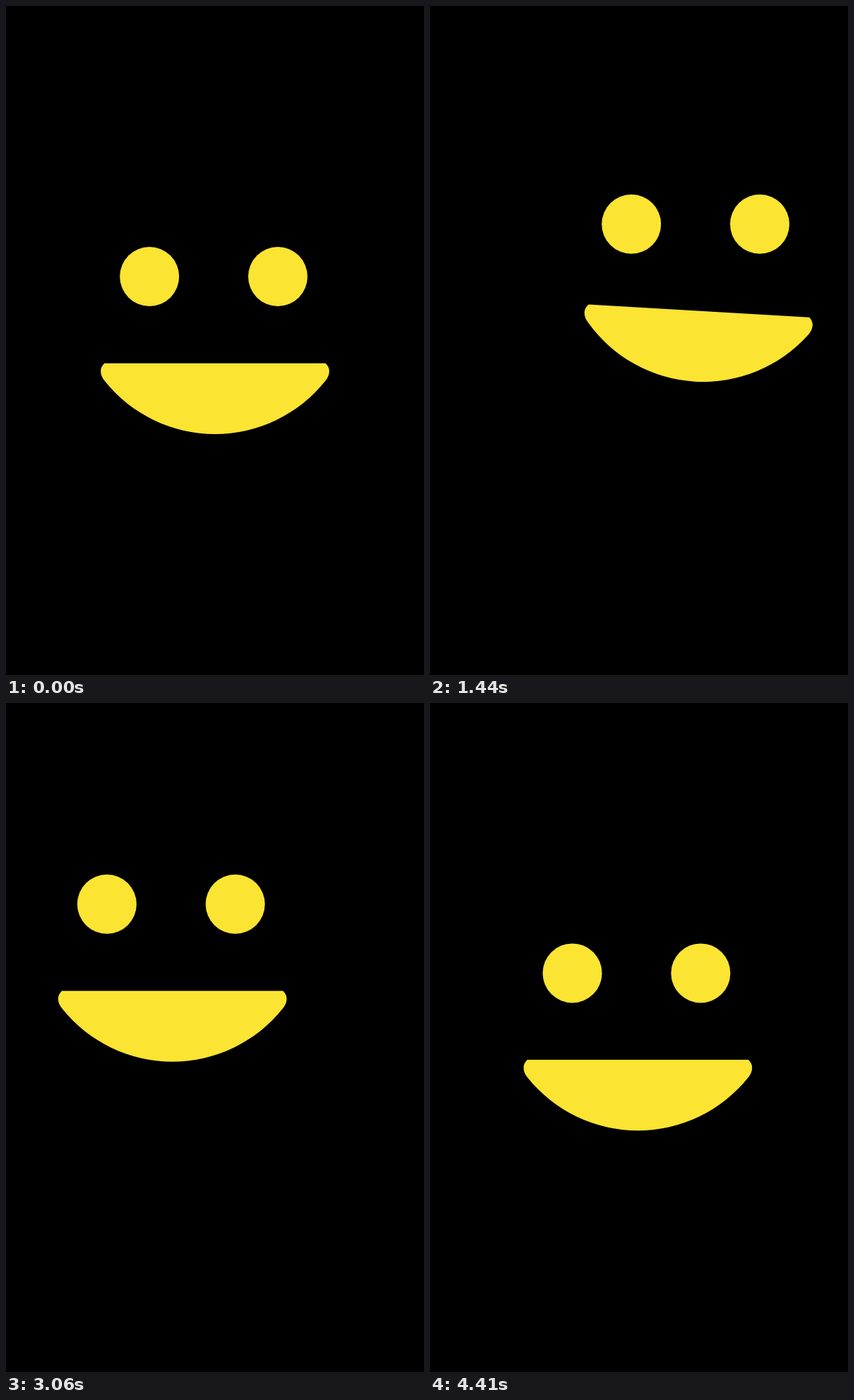
An HTML page with a canvas that plays this animation: 592 px wide and 947 px high, repeating every 4500 ms.

```html
<!DOCTYPE html>
<html lang="en">
<head>
<meta charset="utf-8">
<title>Smiling face</title>
<style>
  html, body { margin: 0; width: 100%; height: 100%; overflow: hidden; background: #000; }
  canvas { display: block; width: 592px; height: 947px; }
</style>
</head>
<body>
<canvas id="stage" width="592" height="947"></canvas>
<script>
const ctx = document.getElementById('stage').getContext('2d');
const LOOP = 4500, STEP = 30, LAST = 4410;
const YELLOW = '#fbe432';
const EYE = { xs: [203.2, 385], y: 383, r: 42 };
const PIVOT = { x: 296, y: 556 };

const mouth = new Path2D(
  'M139.4 505.7H452.6C456.5 509.5 458 513.5 457.8 517.5' +
  'C457.6 522.5 455.5 527 452.2 530.8A200 200 0 0 1 139.8 530.8' +
  'C136.5 527 134.4 522.5 134.2 517.5C134 513.5 135.5 509.5 139.4 505.7Z');

// Each move eases the face along a path of offsets from its resting place.
const moves = [
  [840, 1560, 'M0 0C30 -8 82 -55 84 -83'],
  [2220, 2820, 'M84 -83L-60.3 -109.5'],
  [2820, 3000, 'M-60.3 -109.5V-91'],
  [3000, 3180, 'M-60.3 -91V-119'],
  [3180, 3360, 'M-60.3 -119V-90'],
  [3360, 3540, 'M-60.3 -90V-119'],
  [3540, 4470, 'M-60.3 -119C-64 -62 -49 -18 0 0']
].map(([start, end, d]) => {
  const path = document.createElementNS('http://www.w3.org/2000/svg', 'path');
  path.setAttribute('d', d);
  return { start, end, path, length: path.getTotalLength() };
});

const tilt = [[0, 0], [840, 0], [1560, 4], [2220, 3.5], [2820, 0], [LOOP, 0]];
const blink = [[0, 1], [240, 1], [300, 0.06], [360, 1], [LOOP, 1]];

const clamp = u => Math.min(1, Math.max(0, u));
const ease = u => u * u * (3 - 2 * u);

function linear(keys, t) {
  const i = keys.findIndex(k => k[0] > t);
  const [t0, a] = keys[i - 1], [t1, b] = keys[i];
  return a + (b - a) * (t - t0) / (t1 - t0);
}

function offset(t) {
  const move = moves.filter(m => m.start <= t).pop();
  if (!move) return { x: 0, y: 0 };
  const u = clamp((t - move.start) / (move.end - move.start));
  return move.path.getPointAtLength(ease(u) * move.length);
}

function draw(t) {
  ctx.setTransform(1, 0, 0, 1, 0, 0);
  ctx.fillStyle = '#000';
  ctx.fillRect(0, 0, 592, 947);

  const { x, y } = offset(t);
  ctx.translate(x, y);
  ctx.fillStyle = YELLOW;
  const open = linear(blink, t);
  for (const ex of EYE.xs) {
    ctx.beginPath();
    ctx.ellipse(ex, EYE.y, EYE.r, EYE.r * open, 0, 0, Math.PI * 2);
    ctx.fill();
  }

  ctx.translate(PIVOT.x, PIVOT.y);
  ctx.rotate(linear(tilt, t) * Math.PI / 180);
  ctx.translate(-PIVOT.x, -PIVOT.y);
  ctx.fill(mouth);
}

const began = performance.now();

function tick() {
  const t = (performance.now() - began) % LOOP;
  draw(Math.min(LAST, Math.floor(t / STEP) * STEP));
  requestAnimationFrame(tick);
}
tick();
</script>
</body>
</html>
```
